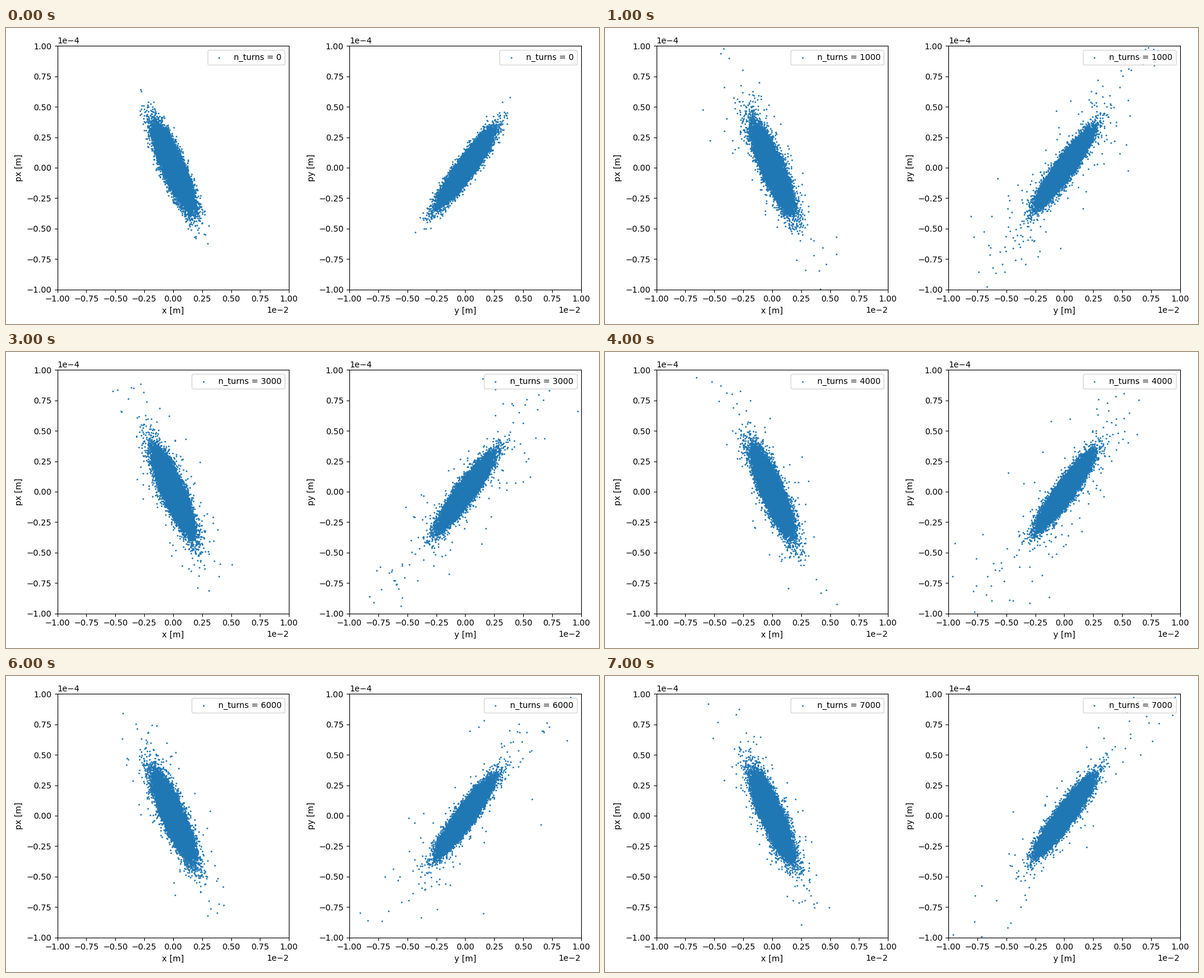
Write a matplotlib script that moves like this. It is 1000 px wide and 500 px high and loops after 8000 ms.

```python
import numpy as np
import matplotlib.pyplot as plt
from matplotlib.animation import FuncAnimation

plt.rcParams["font.family"] = "DejaVu Sans"

FRAMES, INTERVAL = 8, 1000
TURNS_PER_FRAME = 1000
PARTICLES = 20000
X_LIMIT, P_LIMIT = 1e-2, 1e-4


class Beam:
    """Matched Gaussian bunch that grows a halo of escaping particles."""

    def __init__(self, seed, sigma, corr, halo_count, halo_loss, halo_scale, tune):
        self.seed = seed
        self.sigma = np.array(sigma)
        self.corr = corr
        self.halo_count, self.halo_loss = halo_count, halo_loss
        self.halo_scale = halo_scale
        rng = np.random.default_rng(seed)
        u, v = rng.standard_normal((2, PARTICLES))
        self.amplitude, self.phase = np.hypot(u, v), np.arctan2(v, u)
        self.advance = 2 * np.pi * (tune + 3 * self.amplitude**2)

    def halo(self, step):
        rng = np.random.default_rng(100 * self.seed + step)
        count = self.halo_count - self.halo_loss * step
        amplitude = 3.2 + rng.exponential(self.halo_scale, count)
        return amplitude, rng.uniform(0, 2 * np.pi, count)

    def points(self, step):
        amplitude, phase = self.amplitude, self.phase + step * self.advance
        if step:
            far, angle = self.halo(step)
            amplitude = np.concatenate([amplitude, far])
            phase = np.concatenate([phase, angle])
        u, v = amplitude * np.cos(phase), amplitude * np.sin(phase)
        p = self.corr * u + np.sqrt(1 - self.corr**2) * v
        return np.column_stack([u, p]) * self.sigma


def make_panel(ax, name, beam):
    scatter = ax.scatter(*beam.points(0).T, s=1, label="n_turns = 0")
    ax.set(xlim=(-X_LIMIT, X_LIMIT), ylim=(-P_LIMIT, P_LIMIT),
           xticks=np.linspace(-X_LIMIT, X_LIMIT, 9),
           yticks=np.linspace(-P_LIMIT, P_LIMIT, 9),
           xlabel=f"{name} [m]", ylabel=f"p{name} [m]")
    ax.ticklabel_format(style="sci", scilimits=(0, 0))
    label = ax.legend(loc="upper right").get_texts()[0]
    return beam, scatter, label


fig, axes = plt.subplots(1, 2, figsize=(10, 5), dpi=100)
beams = [
    Beam(3, (0.076e-2, 0.15e-4), -0.83, 140, 3, 1.3, 0.31),
    Beam(8, (0.1e-2, 0.128e-4), 0.917, 205, 12, 3.8, 0.32),
]
panels = [make_panel(ax, name, beam) for ax, name, beam in zip(axes, "xy", beams)]
fig.tight_layout()


def update(step):
    for beam, scatter, label in panels:
        scatter.set_offsets(beam.points(step))
        label.set_text(f"n_turns = {step * TURNS_PER_FRAME}")
    return [artist for panel in panels for artist in panel[1:]]


animation = FuncAnimation(fig, update, frames=FRAMES, interval=INTERVAL,
                          init_func=lambda: update(0), repeat=True, repeat_delay=0)
plt.show()
```
